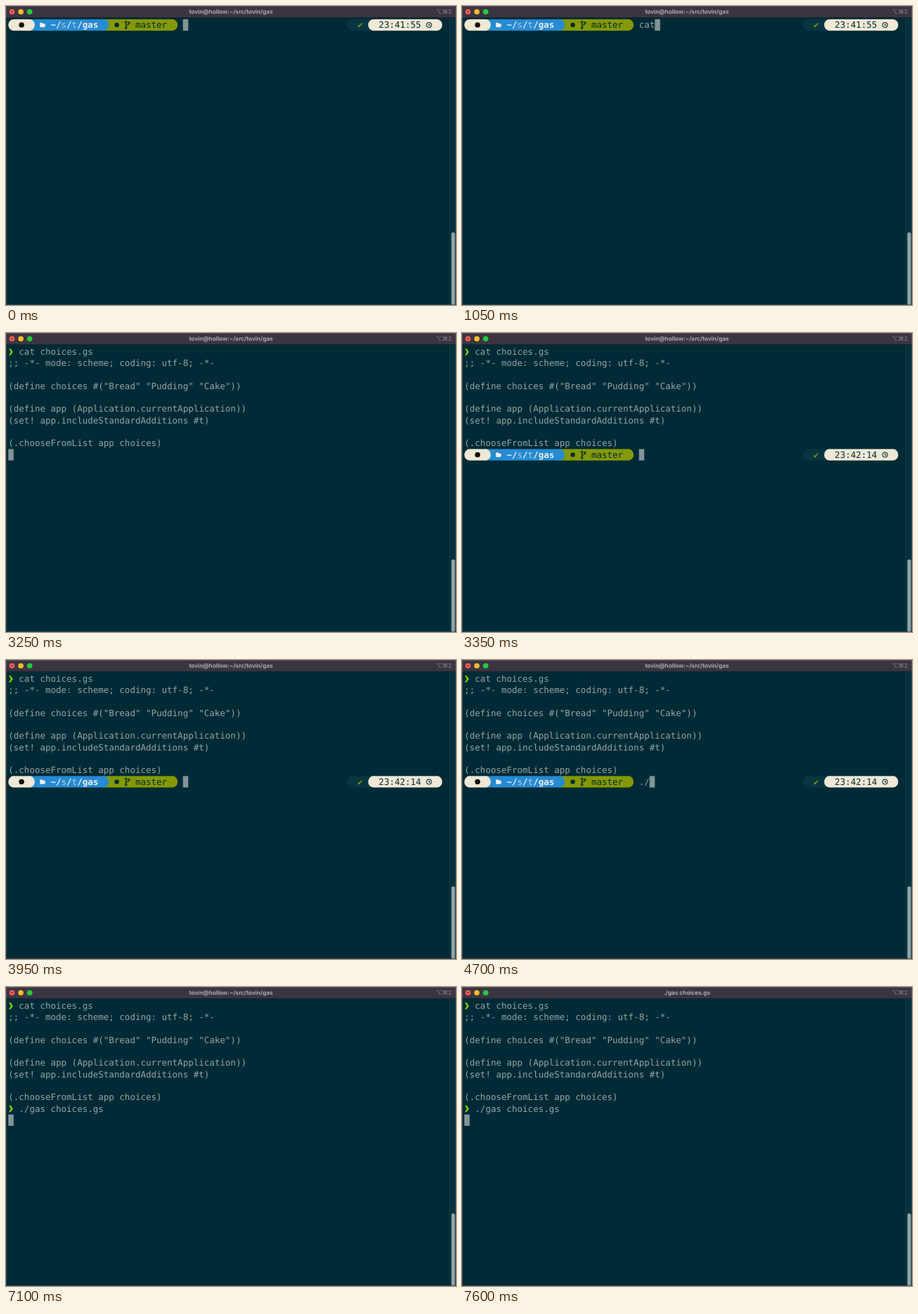
Write an HTML page that moves like this. It is 640x426 px and loops after 8000 ms.

```html
<!DOCTYPE html>
<html lang="en">
<head>
<meta charset="utf-8">
<title>Terminal session</title>
<style>
  html, body { margin: 0; width: 100%; height: 100%; overflow: hidden; background: #002b36; }
  svg { display: block; }
  text { white-space: pre; text-rendering: geometricPrecision; }
  .mono { font: 12.5px "DejaVu Sans Mono", monospace; fill: #94a4a5; }
  .title { font: 600 8.3px Inter, sans-serif; fill: #b9b4bd; text-anchor: middle; }
  .keys { font: 8.6px Inter, "DejaVu Sans", sans-serif; fill: #8d8792; text-anchor: end; }
</style>
</head>
<body>
<svg id="stage" width="640" height="426" viewBox="0 0 640 426"></svg>
<script>
const LOOP = 8000;
const COL = 7.526, ROW = 16.27, LEFT = 3.3, TOP = 18.9, BASELINE = 12.2;
const PROMPT_COL = 33;
const INK = '#002b36', CREAM = '#eee8d5', BLUE = '#268bd2', GREEN = '#859900', SHADE = '#073642';
const HOME_TITLE = 'tovin@hollow:~/src/tovin/gas';

const listing = [
  ';; -*- mode: scheme; coding: utf-8; -*-',
  '',
  '(define choices #("Bread" "Pudding" "Cake"))',
  '',
  '(define app (Application.currentApplication))',
  '(set! app.includeStandardAdditions #t)',
  '',
  '(.chooseFromList app choices)'
];

// Each entry: [start time, text on the command line]
const catTyping = [
  [0, ''], [800, 'c'], [900, 'ca'], [1050, 'cat'], [1150, 'cat '],
  [1700, 'cat c'], [1800, 'cat ch'], [1950, 'cat cho'], [2100, 'cat choices.gs ']
];
const gasTyping = [
  [0, ''], [4450, '.'], [4600, './'], [5350, './g'], [5450, './ga'], [5550, './gas '],
  [6100, './gas c'], [6200, './gas ch'], [6300, './gas cho'], [6500, './gas choices.gs ']
];
const CAT_RUN = 3250, PROMPT_BACK = 3300, GAS_RUN = 7100, TITLE_CHANGE = 7600;

const x = col => LEFT + col * COL;
const y = row => TOP + row * ROW;
const escapeText = s => s.replace(/&/g, '&amp;').replace(/</g, '&lt;');
const typed = (steps, t) => steps.filter(([start]) => start <= t).pop()[1];

const write = (col, row, text, style = '') =>
  `<text class="mono" x="${x(col)}" y="${y(row) + BASELINE}" style="${style}">${escapeText(text)}</text>`;

const block = (from, to, row, fill) =>
  `<rect x="${x(from)}" y="${y(row)}" width="${(to - from) * COL}" height="${ROW}" fill="${fill}"/>`;

// Half-ellipse one cell wide; side is 1 for a right end, -1 for a left end.
// It reaches slightly into the neighbouring block so that no seam shows.
function cap(col, row, fill, side) {
  const edge = x(side > 0 ? col : col + 1);
  const sweep = side > 0 ? 1 : 0;
  return `<path d="M${edge} ${y(row)}a${COL} ${ROW / 2} 0 0 ${sweep} 0 ${ROW}h${-side}v${-ROW}z" fill="${fill}"/>`;
}

const at = (col, row, shapes) =>
  `<g transform="translate(${x(col + 0.5)} ${y(row + 0.5)})">${shapes}</g>`;

const folder = `<path d="M-4-3.3h3l1 1.3h2.6v1.4h1.5l-1.3 3.8h-6.8z" fill="#eee"/>`;
const branch = `<g fill="none" stroke="${INK}" stroke-width="1.2">
  <path d="M-2-2.8V3M-2 1.4C-2-.4 2.3.6 2.3-2"/>
  <circle cx="-2" cy="-4" r="1.2"/><circle cx="-2" cy="4.2" r="1.2"/><circle cx="2.3" cy="-3" r="1.2"/></g>`;
const clock = `<g fill="none" stroke="${INK}" stroke-width="1.1"><circle r="3.5"/><path d="M0-2V.4H1.8"/></g>`;
const chevron = `<path d="M-2.9-4.7H-.6L2.7 0-.6 4.7H-2.9L0 0z" fill="#7be500"/>`;

function prompt(row, time) {
  const bold = 'font-weight:700;fill:#eee';
  const dim = 'fill:#b9cad6';
  return [
    block(4, 18, row, BLUE), block(18, 31, row, GREEN),
    cap(0, row, CREAM, -1), block(1, 4, row, CREAM), cap(4, row, CREAM, 1),
    cap(18, row, BLUE, 1), cap(31, row, GREEN, 1),
    at(2, row, `<circle r="3.8" fill="#111"/>`),
    at(6, row, folder),
    write(8, row, '~/', bold), write(10, row, 's', dim), write(11, row, '/', bold),
    write(12, row, 't', dim), write(13, row, '/gas', bold),
    at(20, row, `<circle r="3.2" fill="${INK}"/>`),
    at(22, row, branch),
    write(24, row, 'master', `fill:${INK}`),
    cap(64, row, SHADE, -1), block(65, 69, row, SHADE),
    write(66, row, '✔', `fill:${GREEN}`),
    cap(68, row, CREAM, -1), block(69, 81, row, CREAM), cap(81, row, CREAM, 1),
    write(70, row, time, `fill:${INK}`),
    at(79, row, clock)
  ].join('');
}

const cursor = (col, row) => block(col, col + 1, row, '#839496');

const editing = (row, time, command) =>
  prompt(row, time) + write(PROMPT_COL, row, command) + cursor(PROMPT_COL + command.length, row);

const executed = (row, command) => at(0, row, chevron) + write(2, row, command);

function terminal(t) {
  if (t < CAT_RUN) return editing(0, '23:41:55', typed(catTyping, t));
  const output = executed(0, 'cat choices.gs') + listing.map((line, i) => write(0, i + 1, line)).join('');
  if (t < PROMPT_BACK) return output + cursor(0, 9);
  if (t < GAS_RUN) return output + editing(9, '23:42:14', typed(gasTyping, t));
  return output + executed(9, './gas choices.gs') + cursor(0, 10);
}

function chrome(title) {
  const lights = ['#fe5f57', '#febc2e', '#28c840']
    .map((fill, i) => `<circle cx="${8.5 + i * 12.6}" cy="8.2" r="3.8" fill="${fill}"/>`).join('');
  return `<rect width="640" height="16.5" fill="#3a3541"/>
    <rect y="16" width="640" height="1" fill="#17232d"/>
    ${lights}<circle cx="8.5" cy="8.2" r="1.1" fill="#8b1a15"/>
    <text class="title" x="320" y="11">${title}</text>
    <text class="keys" x="634" y="10.8">⌥⌘2</text>
    <rect x="631" y="17" width="9" height="409" fill="#06313c"/>
    <rect x="631" y="17" width="1" height="409" fill="#123b45"/>
    <rect x="633.5" y="322.5" width="5" height="103" rx="2.5" fill="#97a4a6"/>
    <rect x=".5" y=".5" width="639" height="425" fill="none" stroke="#fff" stroke-opacity=".15"/>`;
}

const stage = document.getElementById('stage');
let shown = '';

function render(t) {
  const title = t < TITLE_CHANGE ? HOME_TITLE : './gas choices.gs';
  const picture = `<rect width="640" height="426" fill="${INK}"/>` + terminal(t) + chrome(title);
  if (picture !== shown) stage.innerHTML = shown = picture;
}

const begin = performance.now();
function tick() {
  render((performance.now() - begin) % LOOP);
  requestAnimationFrame(tick);
}
tick();
</script>
</body>
</html>
```
